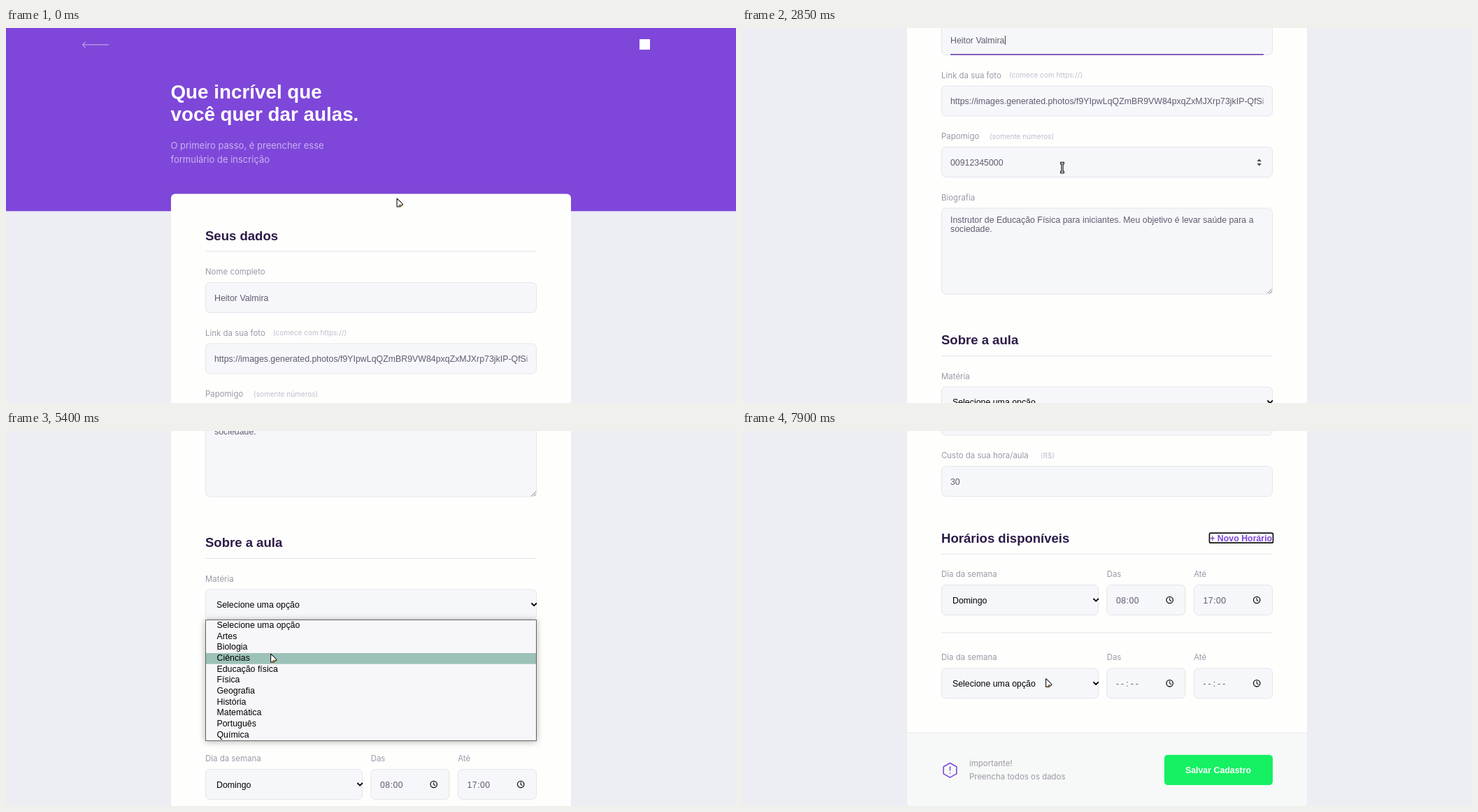
These frames come from a looping animation (1044 px wide and 537 px high, 8000 ms). An HTML page:

```html
<!DOCTYPE html>
<html lang="pt-BR">
<head>
<meta charset="utf-8">
<title>Formulário de inscrição</title>
<style>
  html, body { margin: 0; width: 100%; height: 100%; overflow: hidden; background: #edeef3; }
  svg { display: block; }
  #stage { width: 100%; height: 100%; }
  text { font: 12.36px "Liberation Sans", Arial, sans-serif; fill: #625b70; white-space: pre; }
  .title { font-size: 27.8px; font-weight: bold; fill: #fff; }
  .intro { font: 13px Inter, sans-serif; fill: #cbb2f2; }
  .h2 { font-size: 18.55px; font-weight: bold; fill: #2d1c48; }
  .label { font: 11.45px Inter, sans-serif; fill: #9c98a6; }
  .hint { font: 10px Inter, sans-serif; fill: #c1bccc; }
  .option { fill: #000; }
  .bold { font-weight: bold; }
  .hour { letter-spacing: .45px; }
  .blank { letter-spacing: 3px; }
  .menu { filter: drop-shadow(0 1px 5px rgba(0, 0, 0, .3)); }
</style>
</head>
<body>
<svg id="stage" viewBox="0 0 1044 537"></svg>
<script>
const LOOP = 8000, STEP = 50, ROW = 119.3;
const PURPLE = '#7e47d9', FOCUS = '#6a3fb0', LINE = '#e5e5ec';
const NAME_CLICK = 1750, BIO_CLICK = 3550, OPEN = 4750, PICK = 5800, PRESS = 7150, ADD = 7300;

const subjects = ['Selecione uma opção', 'Artes', 'Biologia', 'Ciências', 'Educação física', 'Física',
  'Geografia', 'História', 'Matemática', 'Português', 'Química'];

// [time, scroll offset]
const scrollKeys = [[750, 0], [1000, 82], [1250, 82], [1300, 87.5], [1500, 158], [1600, 164], [1750, 164],
  [2550, 369], [3720, 369], [4350, 579.5], [4550, 656], [5900, 656], [6450, 800.7], [7350, 800.7], [7750, 920]];

// [time, x, y, pointer shape from here on]
const pointerKeys = [[0, 558.5, 243.5, 'arrow'], [450, 558.5, 243.5, 'arrow'], [650, 441, 232, 'arrow'],
  [1600, 441, 232, 'beam'], [1850, 441, 232, 'arrow'], [2700, 441, 232, 'arrow'], [2800, 456, 206, 'beam'],
  [2850, 458, 200, 'beam'], [3050, 458, 198, 'beam'], [3150, 453, 220, 'arrow'], [3300, 443, 270, 'beam'],
  [3400, 440, 283, 'beam'], [3750, 440, 283, 'arrow'], [4550, 440, 283, 'arrow'], [4600, 420, 250, 'arrow'],
  [5150, 420, 250, 'arrow'], [5400, 378, 318.5, 'arrow'], [5600, 374, 341, 'arrow'], [6450, 374, 341, 'arrow'],
  [7050, 683, 276, 'hand'], [7600, 683, 276, 'arrow'], [7900, 434, 354, 'arrow']];

const pointers = {
  arrow: `<path d="M.6.6V12.4H5.5L9 9.2Q8.4 7.6.6.6Z" fill="#fff" stroke="#222" stroke-width="1.2" stroke-linejoin="round"/>
    <ellipse cx="5.3" cy="10.7" rx="2.1" ry="1.6" fill="#947332"/>`,
  beam: `<path d="M-3-6.5H3M-3 6.5H3M0-6.5V6.5" stroke="#222" stroke-width="3.4"/>
    <path d="M-2-6.5H2M-2 6.5H2M0-6.5V6.5" stroke="#fff" stroke-width="1"/>`,
  hand: `<path d="M-1 8V1Q0-1 1.2 1V5L7 6Q8.3 6.6 8 8.5L6.6 13.5H0L-3.2 8.6Q-3 7-1 8Z"
    fill="#fff" stroke="#222" stroke-width="1.1" stroke-linejoin="round"/>`
};

const at = (keys, t, i = 1) => {
  const n = keys.findIndex(k => k[0] > t);
  if (n === 0) return keys[0][i];
  if (n < 0) return keys[keys.length - 1][i];
  const a = keys[n - 1], b = keys[n];
  return a[i] + (b[i] - a[i]) * (t - a[0]) / (b[0] - a[0]);
};

const text = (x, y, s, cls = '') => `<text x="${x}" y="${y}" class="${cls}">${s}</text>`;
const rect = (x, y, w, h, fill, more = '') =>
  `<rect x="${x}" y="${y}" width="${w}" height="${h}" fill="${fill}" ${more}/>`;
const path = (d, color, width = 1) =>
  `<path d="${d}" fill="none" stroke="${color}" stroke-width="${width}" stroke-linecap="round" stroke-linejoin="round"/>`;
const box = (y, h = 43, x = 285.5, w = 473) => rect(x, y, w, h, '#f6f7fa', `rx="6" stroke="${LINE}"`);
const rule = (y, x = 285, w = 474) => rect(x, y - .5, w, 1, LINE);
const underline = y => rect(298, y - .8, 448, 1.6, FOCUS);
const caret = (x, y) => rect(x, y, 1, 13, '#444');
const select = (y, s, w = 473) => box(y, 43, 285.5, w) + text(301, y + 26, s, 'option') +
  path(`M${279.5 + w - .5} ${y + 20}l3.2 3.2 3.2-3.2`, '#000', 1.8);
const input = (y, s) => box(y) + text(298, y + 26.3, s);
const section = (y, s) => text(285, y, s, 'h2') + rule(y + 16.5);

function time(x, y, label, value) {
  return text(x, y - 11.5, label, 'label') + box(y, 43, x + .3, 112) +
    text(x + 13.3, y + 26, value, value[0] === '-' ? 'blank' : 'hour') +
    `<circle cx="${x + 90}" cy="${y + 21.5}" r="4.7" fill="none" stroke="#111" stroke-width="1.3"/>` +
    path(`M${x + 90} ${y + 18.8}v3l2 1.2`, '#111', 1.1);
}

const schedule = (y, day, from, to) => text(285, y - 11.5, 'Dia da semana', 'label') +
  select(y, day, 224) + time(521.7, y, 'Das', from) + time(646.2, y, 'Até', to);

function header() {
  return rect(0, 0, 1044, 262.3, PURPLE) +
    path('M146.5 24H109.5l4-4m-4 4l4 4', '#b391e9', 1.3) +
    rect(906, 16, 15, 15, '#fff') +
    text(235.5, 101, 'Que incrível que', 'title') +
    text(235.5, 133.3, 'você quer dar aulas.', 'title') +
    text(235.5, 172.6, 'O primeiro passo, é preencher esse', 'intro') +
    text(235.5, 192.8, 'formulário de inscrição', 'intro');
}

function personal(t, spinner) {
  const blink = Math.floor((t - NAME_CLICK) / 500) % 2 === 0;
  let s = section(303.5, 'Seus dados') +
    text(285, 353, 'Nome completo', 'label') + input(364.5, 'Heitor Valmira') +
    text(285, 440.5, 'Link da sua foto', 'label') + text(382, 440.3, '(comece com https://)', 'hint') + box(452) +
    `<svg x="298" y="452" width="447.5" height="43">${
      text(0, 26.3, 'https://images.generated.photos/f9YIpwLqQZmBR9VW84pxqZxMJXrp73jkIP-QfSi')}</svg>` +
    text(285, 528, 'Papomigo', 'label') + text(354, 527.8, '(somente números)', 'hint') +
    input(539.5, '00912345000') +
    text(285, 615.5, 'Biografia', 'label') + box(627, 123) +
    text(298, 647.5, 'Instrutor de Educação Física para iniciantes. Meu objetivo é levar saúde para a') +
    text(298, 660.7, 'sociedade.') +
    path('M751.5 749l6-6m-2.5 6l2.5-2.5', '#777');
  if (spinner) s += '<path d="M736.5 560l3.2-3.5 3.2 3.5zm0 3l3.2 3.5 3.2-3.5z" fill="#444"/>';
  if (t >= NAME_CLICK && t < BIO_CLICK) s += underline(407) + (blink ? caret(376, 380) : '');
  if (t >= BIO_CLICK && t < OPEN) s += underline(755) + caret(358, 650);
  return s;
}

function lesson(t) {
  let s = section(822, 'Sobre a aula') +
    text(285, 871.5, 'Matéria', 'label') + select(883, subjects[t < PICK ? 0 : 4]) +
    text(285, 959, 'Custo da sua hora/aula', 'label') + text(427, 959, '(R$)', 'hint') + input(970.5, '30') +
    section(1079.7, 'Horários disponíveis') +
    `<text x="669.2" y="1078" class="bold" style="fill:${t >= 7050 && t < 7600 ? '#6b40c4' : PURPLE}">+ Novo Horário</text>` +
    schedule(1140.5, 'Domingo', '08:00', '17:00');
  if (t >= PRESS) s += rect(668.5, 1066.2, 91, 14, 'none',
    `rx="2" stroke="${t < ADD ? '#5730a8' : '#101010'}" stroke-width="1.7"`);
  if (t >= ADD) s += rule(1209) + schedule(1140.5 + ROW, subjects[0], '--:--', '--:--');
  return s;
}

function footer(y) {
  return `<path d="M236 ${y}h572v99q0 6-6 6H242q-6 0-6-6z" fill="#f7f9f8"/>` + rule(y, 236, 572) +
    path(`M297.5 ${y + 43}l9.3 5.2v10.2l-9.3 5.2-9.3-5.2v-10.2z`, PURPLE, 1.6) +
    path(`M297.5 ${y + 48.3}v5.2m0 4v.2`, PURPLE, 1.6) +
    text(325, y + 47.8, 'importante!', 'label') + text(325, y + 66.5, 'Preencha todos os dados', 'label') +
    rect(604, y + 31.3, 155, 43.3, '#15f162', 'rx="5"') +
    `<text x="681" y="${y + 57.6}" text-anchor="middle" class="bold" style="fill:#fff">Salvar Cadastro</text>`;
}

function menu(y) {
  const row = 15.68, top = 271, active = y > top ? Math.floor((y - top) / row) : 0;
  return rect(285.5, 270.5, 473, 173, '#f7f7fa', 'stroke="#666" class="menu"') +
    rect(286, top + active * row, 472, row, '#9cc1b8') +
    subjects.map((s, i) => text(301.5, 282 + i * row, s, 'option')).join('');
}

function draw(t) {
  const scroll = at(scrollKeys, t), extra = t >= ADD ? ROW : 0;
  const x = at(pointerKeys, t, 1), y = at(pointerKeys, t, 2);
  const shape = pointerKeys.filter(k => k[0] <= t).pop()[3];
  const spinner = shape === 'beam' && Math.abs(y + scroll - 561) < 21.5;
  return rect(0, 0, 1044, 537, '#edeef3') +
    `<g transform="translate(0 ${-scroll})">` + header() +
    rect(236, 237.5, 572, 1100.7 + extra, '#fefefd', 'rx="6"') +
    personal(t, spinner) + lesson(t) + footer(1233.2 + extra) + '</g>' +
    (t >= OPEN && t < PICK ? menu(y) : '') +
    `<g transform="translate(${x} ${y})">${pointers[shape]}</g>`;
}

const stage = document.getElementById('stage');
const start = performance.now();
let last = -1;
function tick() {
  const t = Math.floor((performance.now() - start) % LOOP / STEP) * STEP;
  if (t !== last) stage.innerHTML = draw(last = t);
  requestAnimationFrame(tick);
}
tick();
</script>
</body>
</html>
```
